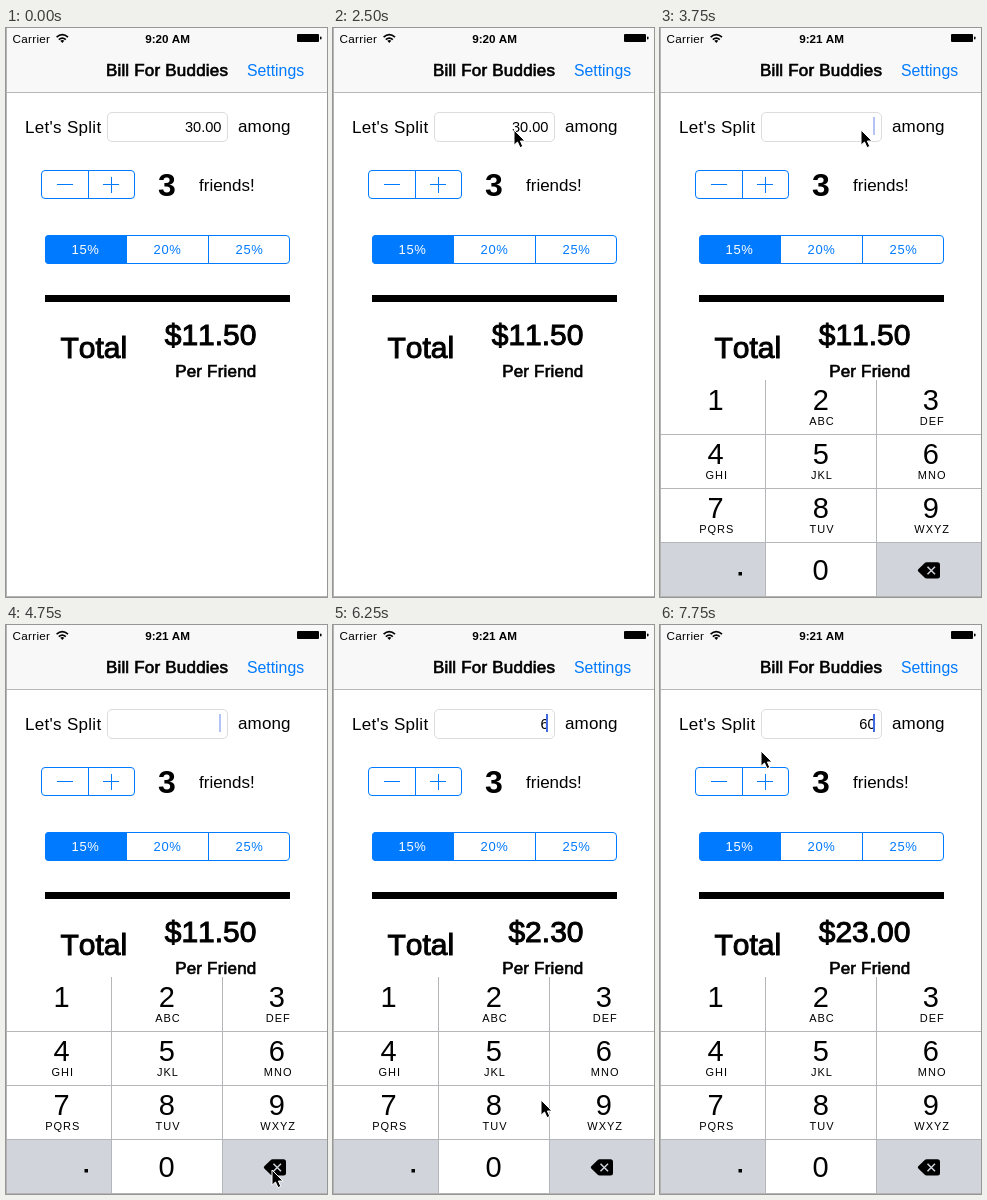
An HTML page for the animation above (8000 ms loop, 321 by 569 pixels).

```html
<!DOCTYPE html>
<html lang="en">
<head>
<meta charset="utf-8">
<title>Bill splitter</title>
<style>
  html, body { margin: 0; width: 100%; height: 100%; overflow: hidden; background: #fff; }
  svg { display: block; width: 100%; height: 100%; }
  text { font-family: "Liberation Sans", Arial, Helvetica, sans-serif; font-size: 17px; font-kerning: none; }
  .medium { stroke: #000; stroke-width: .65; letter-spacing: .2px; }
  .big { font-size: 30px; stroke: #000; stroke-width: 1; }
  .status { font-size: 11.7px; }
  .mid { text-anchor: middle; }
  .end { text-anchor: end; }
  .blue { fill: #007aff; }
  .line { fill: none; stroke: #007aff; }
  .seg { font-size: 13px; letter-spacing: .6px; text-anchor: middle; }
  .digit { font-size: 29px; text-anchor: middle; }
  .letters { font-size: 11px; letter-spacing: 1px; text-anchor: middle; }
</style>
</head>
<body>
<svg viewBox="0 0 321 569">
  <rect width="321" height="569" fill="#fff"/>
  <rect width="321" height="64" fill="#f8f8f8"/>
  <rect y="64" width="321" height="1" fill="#b8b8b8"/>

  <text class="status" x="6.5" y="15" letter-spacing=".3">Carrier</text>
  <g fill="none" stroke="#000" stroke-width="1.7">
    <path d="M50.6 9.2Q56.3 4.1 62 9.2M52.8 11.6Q56.3 8.5 59.8 11.6"/>
    <path d="M54.3 12.7Q56.3 11.2 58.3 12.7L56.3 14.9Z" fill="#000" stroke="none"/>
  </g>
  <text id="clock" class="status end" x="184" y="15" font-weight="bold"></text>
  <rect x="291" y="6" width="22" height="8" rx="1"/>
  <rect x="314" y="8.5" width="1.5" height="3" rx=".7"/>

  <text class="medium mid" x="161" y="48">Bill For Buddies</text>
  <text class="blue" x="241" y="48" style="font-size:15.8px">Settings</text>

  <text x="19" y="105" letter-spacing=".3">Let's Split</text>
  <rect x="101.5" y="84.5" width="120" height="29" rx="4.5" fill="#fff" stroke="#dcdcdc"/>
  <text id="amount" class="end" x="215.5" y="104" style="font-size:14.6px"></text>
  <rect id="caret" x="213" y="89" width="2" height="18" fill="#4169e1"/>
  <text x="232" y="104" letter-spacing=".15">among</text>

  <rect class="line" x="35.5" y="142.5" width="93" height="28" rx="3.5"/>
  <path class="line" d="M82.5 142.5V170.5M51 156.5H67M97 156.5H113M105.5 149V165"/>
  <text class="mid" x="161" y="168" style="font-size:32px;font-weight:bold">3</text>
  <text x="193" y="163">friends!</text>

  <rect class="line" x="39.5" y="207.5" width="244" height="28" rx="3.5"/>
  <path class="blue" d="M121 207H43Q39 207 39 211V232Q39 236 43 236H121Z"/>
  <path class="line" d="M202.5 207.5V235.5"/>
  <text class="seg" x="79.5" y="226" fill="#fff">15%</text>
  <text class="seg blue" x="161.5" y="226">20%</text>
  <text class="seg blue" x="243.5" y="226">25%</text>

  <rect x="39" y="267" width="245" height="7"/>
  <text class="big" x="54.5" y="329.5">Total</text>
  <text id="share" class="big end" x="250.5" y="316.5"></text>
  <text class="medium end" x="250.5" y="348.5">Per Friend</text>

  <g id="pad">
    <rect y="352" width="321" height="217" fill="#fff"/>
    <path d="M0 514H105V569H0ZM216 514H321V569H216Z" fill="#d1d5db"/>
    <path d="M0 406.5H321M0 460.5H321M0 514.5H321M105.5 352V569M216.5 352V569" stroke="#b4b6ba" fill="none"/>
    <g id="keys"></g>
    <rect x="78.5" y="544" width="3.5" height="3.5"/>
    <path d="M258.3 541.3L264.5 535.2Q265.4 534.3 266.8 534.3H277.5Q280 534.3 280 536.8V548Q280 550.5 277.5 550.5H266.8Q265.4 550.5 264.5 549.6L258.3 543.5Q257.2 542.4 258.3 541.3Z"/>
    <path d="M267.5 538.7L275 546.2M275 538.7L267.5 546.2" stroke="#d1d5db" stroke-width="1.5"/>
  </g>

  <path d="M.5 0V569M0 568.5H321" stroke="#b4b4b4" fill="none"/>
  <path id="pointer" d="M0 0V15.2L3.5 12L6 17.6L8.8 16.4L6.4 11H11Z" stroke="#fff"/>
</svg>
<script>
const LOOP = 8000;
const STEP = 250;
const PAD_HEIGHT = 217;
const TIP = 0.15;
const FRIENDS = 3;
const $ = id => document.getElementById(id);

// The pointer rests between moves.
const moves = [
  { from: 750, to: 1500, x: 191, y: 98.5 },   // onto the field
  { from: 2000, to: 2500, x: 181, y: 102 },
  { from: 2750, to: 3250, x: 208, y: 102 },
  { from: 3250, to: 3750, x: 201, y: 102 },
  { from: 4000, to: 4750, x: 266, y: 545 },   // over the delete key
  { from: 4750, to: 5750, x: 256, y: 417 },   // to the 6
  { from: 6000, to: 6500, x: 160, y: 533 },   // to the 0
  { from: 6750, to: 7750, x: 101, y: 126 }    // to the stepper
];
const edits = [
  { at: 3250, text: "", bill: 30 },
  { at: 6000, text: "6", bill: 6 },
  { at: 7000 - STEP, text: "60", bill: 60 }
];
const idle = { text: "30.00", bill: 30 };

const clamp = v => Math.min(1, Math.max(0, v));
const progress = (t, from, to) => clamp((t - from) / (to - from));
const smooth = p => p * p * (3 - 2 * p);

function pointerAt(t) {
  let x = 330, y = 390;
  for (const m of moves) {
    const p = smooth(progress(t, m.from, m.to));
    x += (m.x - x) * p;
    y += (m.y - y) * p;
  }
  return `translate(${x} ${y})`;
}

// Solid for half a second after an edit, then fades out and repeats.
function caretAt(t, edit) {
  if (edit === idle) return 0;
  const phase = (t - edit.at) % 1000;
  return phase < 500 ? 1 : phase < 750 ? 0.4 : 0;
}

function buildKeys() {
  const letters = ["", "ABC", "DEF", "GHI", "JKL", "MNO", "PQRS", "TUV", "WXYZ"];
  const label = (cls, x, y, s) => `<text class="${cls}" x="${x}" y="${y}">${s}</text>`;
  let keys = label("digit", 160.5, 551.5, 0);
  letters.forEach((word, i) => {
    const x = 55.5 + 107.7 * (i % 3) - (i % 3 === 1 ? 2.5 : 0);
    const y = 381.5 + 54 * Math.floor(i / 3);
    keys += label("digit", x, y, i + 1) + label("letters", x + 1.3, y + 15.5, word);
  });
  $("keys").innerHTML = keys;
}

function draw(t) {
  const edit = edits.filter(e => e.at <= t).pop() || idle;
  const hidden = Math.pow(1 - progress(t, 3000, 3500), 2.5);
  $("pointer").setAttribute("transform", pointerAt(t));
  $("pad").setAttribute("transform", `translate(0 ${PAD_HEIGHT * hidden})`);
  $("caret").setAttribute("opacity", caretAt(t, edit));
  $("amount").textContent = edit.text;
  $("share").textContent = "$" + (edit.bill * (1 + TIP) / FRIENDS).toFixed(2);
  $("clock").textContent = t < 3500 ? "9:20 AM" : "9:21 AM";
}

buildKeys();
const start = performance.now();
function tick() {
  const t = (performance.now() - start) % LOOP;
  draw(Math.floor(t / STEP) * STEP);
  requestAnimationFrame(tick);
}
tick();
</script>
</body>
</html>
```
